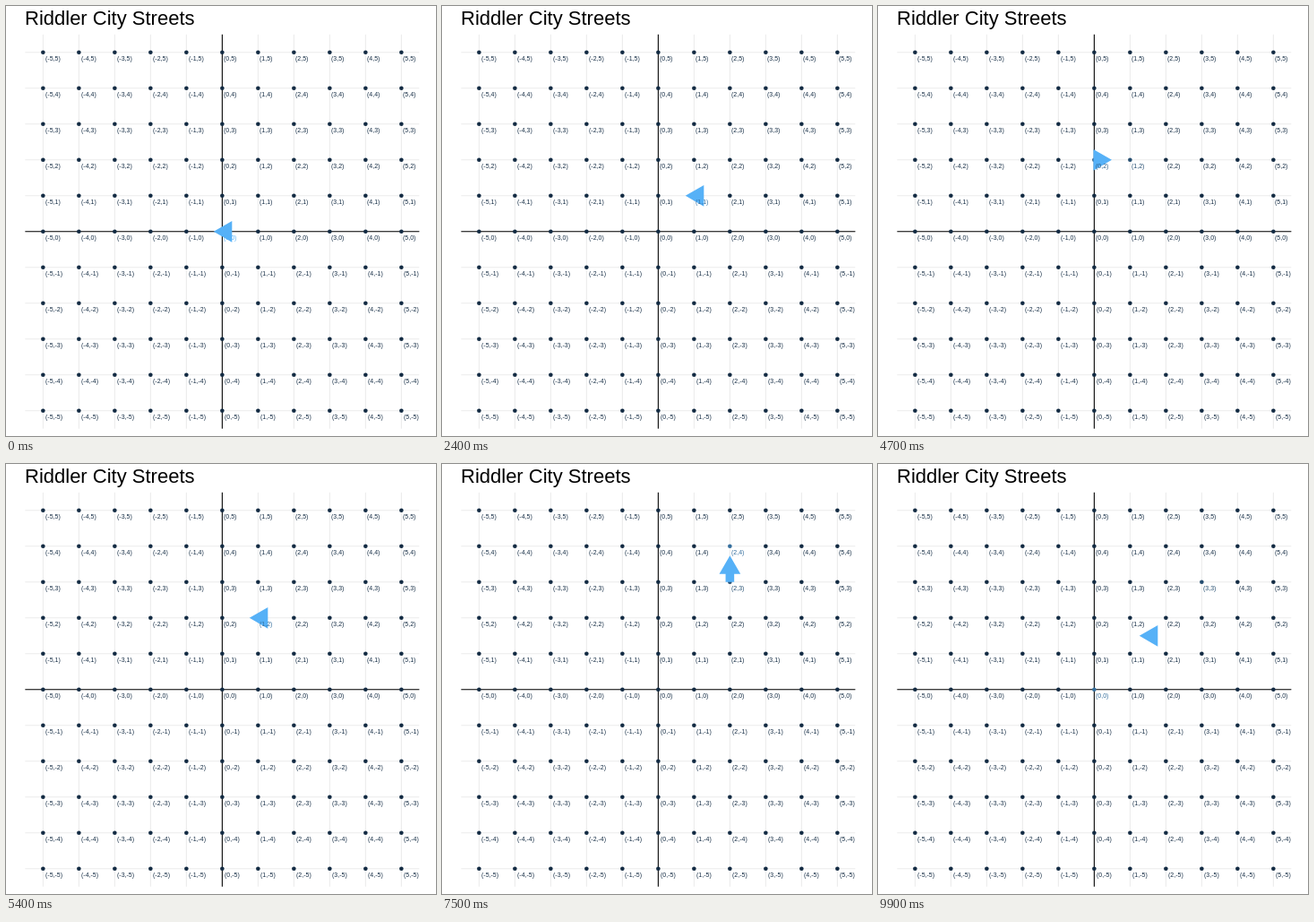
An HTML page that plays this animation: 480x480 px, repeating every 10 s.

```html
<!DOCTYPE html>
<html lang="en">
<head>
<meta charset="utf-8">
<title>Riddler City Streets</title>
<style>
  html, body { margin: 0; width: 100%; height: 100%; overflow: hidden; background: #fff; }
  svg { display: block; width: 480px; height: 480px; }
  .grid { stroke: #ebebeb; stroke-width: 1.07; }
  .axis { stroke: #000; stroke-width: 1.07; }
  .text {
    position: absolute; white-space: nowrap; line-height: 0;
    font-family: "Liberation Sans", Arial, sans-serif;
  }
  /* Strut that puts the baseline 20px below the top of the box */
  .text::before { content: ""; display: inline-block; height: 20px; }
</style>
</head>
<body>
<svg id="stage" viewBox="0 0 480 480"></svg>
<script>
const stage = document.getElementById('stage');
const CELL = 40, TICK = 100, TICKS = 100;
const DARK = [19, 43, 67], LIGHT = [86, 177, 247];
const SHAFT = 9.6, TIP = SHAFT, BACK = 10.94;
const WING = (TIP + BACK) * Math.tan(Math.PI / 6);
const px = x => 241.37 + CELL * x;
const py = y => 251.78 - CELL * y;
const mix = (a, b, t) => a + (b - a) * t;
const shade = t => `rgb(${DARK.map((c, i) => Math.round(mix(c, LIGHT[i], t)))})`;
const ease = t => (1 - Math.cos(Math.PI * t)) / 2;

function add(parent, tag, attrs) {
  const el = document.createElementNS('http://www.w3.org/2000/svg', tag);
  for (const name in attrs) el.setAttribute(name, attrs[name]);
  return parent.appendChild(el);
}

function write(text, x, baseline, size, color) {
  const el = document.createElement('div');
  el.className = 'text';
  el.textContent = text;
  el.style.left = Math.round(x) + 'px';
  el.style.top = Math.round(baseline) - 20 + 'px';
  el.style.fontSize = size + 'px';
  el.style.color = color;
  return document.body.appendChild(el);
}

// Static plot
write('Riddler City Streets', px(-5.5), 21, 22, '#000');
const line = (cls, x1, y1, x2, y2) => add(stage, 'line', { class: cls, x1, y1, x2, y2 });
const hLine = (cls, y) => line(cls, px(-5.5), py(y), px(5.5), py(y));
const vLine = (cls, x) => line(cls, px(x), py(-5.5), px(x), py(5.5));
for (let i = -5; i <= 5; i++) { hLine('grid', i); vLine('grid', i); }
hLine('axis', 0);
vLine('axis', 0);

const dots = add(stage, 'g', {});
const arrow = add(stage, 'path', { fill: shade(1) });
const marks = {};
for (let x = -5; x <= 5; x++) {
  for (let y = -5; y <= 5; y++) {
    const minus = (x < 0) + (y < 0);
    const inset = 0.14 * (14 + 2 * minus);
    marks[[x, y]] = {
      dot: add(dots, 'circle', { cx: px(x), cy: py(y), r: 2.3, fill: shade(0) }),
      label: write(`(${x},${y})`, px(x) + inset, py(y) + 9, 7, shade(0))
    };
  }
}

// Each step of the walk: the head reaches the next corner, then the tail follows
const walk = [[0, 0], [1, 0], [1, 1], [0, 1], [0, 2], [1, 2], [1, 3], [2, 3], [2, 4], [3, 4], [3, 3]];
const states = [
  { tail: walk[0], head: walk[0], glow: 1 },
  { tail: walk[0], head: walk[0], glow: 0, hidden: true }
];
for (let i = 1; i < walk.length; i++) {
  states.push({ tail: walk[i - 1], head: walk[i], glow: 1 });
  states.push({ tail: walk[i], head: walk[i], glow: 0.5 });
}
const arrival = k => k < 15 ? 5 * k - 1 : 4 * k + 12;
const moveTicks = k => k < 16 ? 3 : 2;

function arrowPath(tail, head) {
  const [x0, y0] = [px(tail[0]), py(tail[1])];
  const [x, y] = [px(head[0]), py(head[1])];
  const len = Math.hypot(x - x0, y - y0);
  const [ux, uy] = len > 0.01 ? [(x - x0) / len, (y - y0) / len] : [-1, 0];
  const at = (along, side) => `${x + ux * along - uy * side},${y + uy * along + ux * side}`;
  const h = SHAFT / 2;
  const shaft = len > 0.01 ? `M${at(-len, -h)}L${at(0, -h)}L${at(0, h)}L${at(-len, h)}Z` : '';
  // Both outlines wind the same way, so their overlap stays filled
  return shaft + `M${at(TIP, 0)}L${at(-BACK, WING)}L${at(-BACK, -WING)}Z`;
}

function paint(key, level) {
  const { dot, label } = marks[key];
  dot.setAttribute('fill', shade(level));
  label.style.color = shade(level);
}

function draw(tick) {
  let k = 0;
  while (arrival(k + 1) <= tick) k++;
  const a = states[k], b = states[(k + 1) % states.length];
  const steps = moveTicks(k + 1);
  const t = ease(Math.max(0, (tick - arrival(k + 1) + steps) / steps));
  const between = (p, q) => p.map((v, i) => mix(v, q[i], t));

  arrow.setAttribute('visibility', a.hidden ? 'hidden' : 'visible');
  arrow.setAttribute('d', arrowPath(between(a.tail, b.tail), between(a.head, b.head)));

  walk.forEach(p => paint(p, 0));
  const level = (s, p) => String(s.head) === String(p) ? s.glow : 0;
  for (const p of [a.head, b.head]) paint(p, mix(level(a, p), level(b, p), t));
}

const start = performance.now();
let shown = -1;
function loop() {
  const tick = Math.floor(Math.max(0, performance.now() - start) / TICK) % TICKS;
  if (tick !== shown) draw(shown = tick);
  requestAnimationFrame(loop);
}
loop();
</script>
</body>
</html>
```
